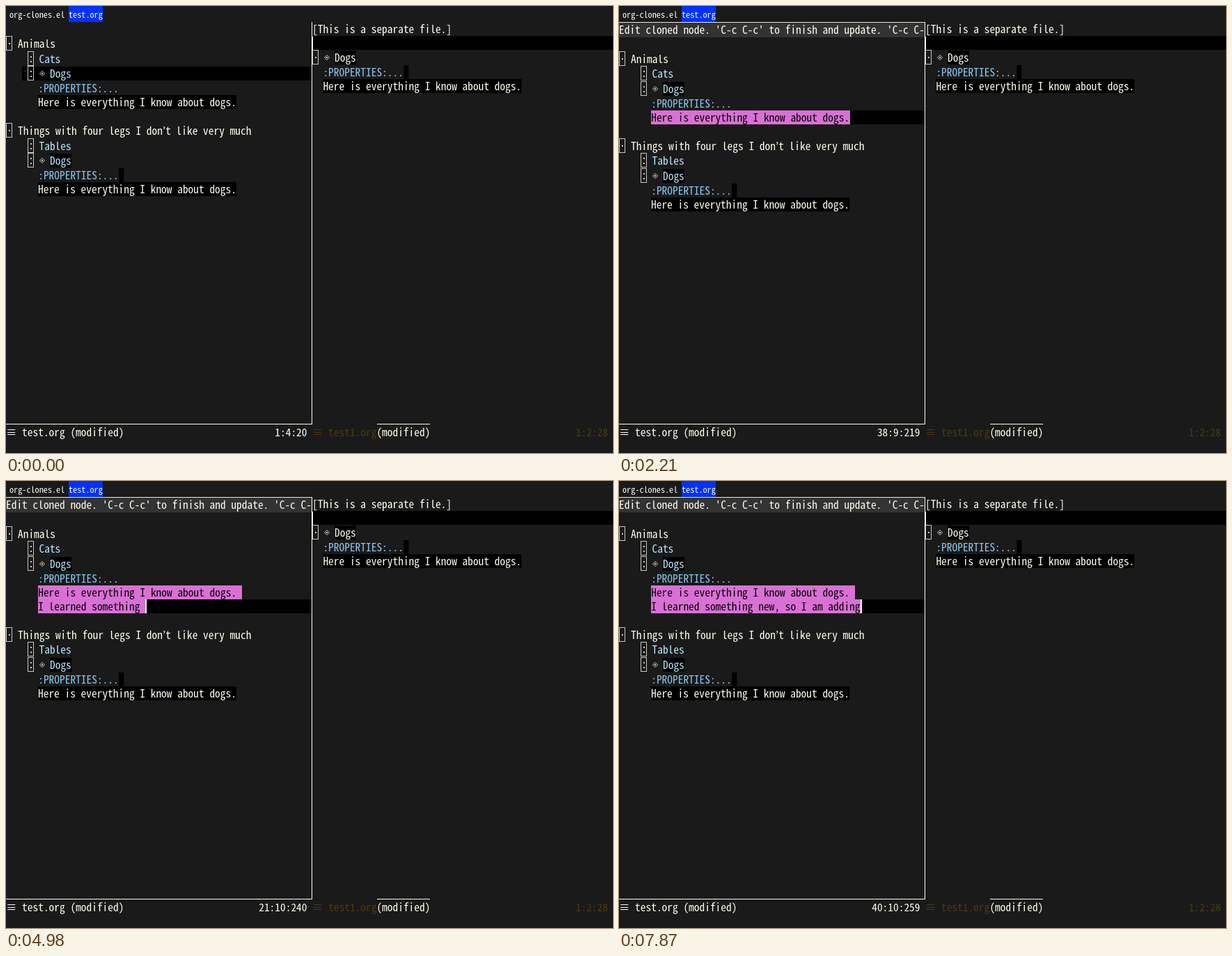
An HTML page with a canvas that plays this animation: 872x642 px, repeating every 8 s.

```html
<!DOCTYPE html>
<html lang="en">
<head>
<meta charset="utf-8">
<title>Editing a cloned node</title>
<style>
html, body { margin: 0; width: 100%; height: 100%; overflow: hidden; background: #1a1a1a; }
canvas { display: block; }
</style>
</head>
<body>
<canvas id="stage" width="872" height="642"></canvas>
<script>
const ctx = document.getElementById('stage').getContext('2d');
const LOOP = 8000, CELL = 7.7, EDGE = 439, INDENT = 46.2;
const CREAM = '#fffff0', BLUE = '#b8e8ff', SKY = '#87c8f0', PINK = '#da70d6', DIM = '#4a3c0c';
const SENTENCE = 'Here is everything I know about dogs.';
const FONT = '"Noto Sans Mono CJK JP", "Noto Sans Mono", monospace';

// Bursts of typing: first time, last time, keys split by "|"; "<" deletes.
const bursts = [
  [3180, 3530, 'I| |l|e|ar'], [3630, 3700, 'n|e'], [3980, 4150, 'd| |s'],
  [4420, 4450, 'o|me'], [4590, 4840, 't|h|i|n'], [4980, 4980, 'g '],
  [5040, 5240, 'n|e|w'], [5380, 5420, ' |s'], [5620, 5620, 'o'],
  [5800, 5890, '<|<'], [6260, 6340, '<|,'], [6480, 6480, ' '],
  [6620, 6740, 's|o| '], [6940, 7310, 'I| |a|m| |a'], [7570, 7570, 'dd'],
  [7720, 7870, 'i|n|g']
];

function typed(t) {
  let out = '';
  for (const [from, to, keys] of bursts) {
    const list = keys.split('|');
    list.forEach((key, i) => {
      const at = from + (to - from) * i / Math.max(1, list.length - 1);
      if (t >= at) out = key === '<' ? out.slice(0, -1) : out + key;
    });
  }
  return out;
}

function rect(x, y, w, h, color) {
  ctx.fillStyle = color;
  ctx.fillRect(x, y, w, h);
}

function setFont(cell) {
  ctx.font = `${cell * 2}px ${FONT}`;
  ctx.letterSpacing = '0px';
  ctx.letterSpacing = `${cell - ctx.measureText('0').width}px`;
}

// y is the middle of the capitals
function text(str, x, y, color = CREAM) {
  ctx.fillStyle = color;
  ctx.fillText(str, x, y + 5.7);
}

function bullet(x, y, dots) {
  ctx.strokeStyle = '#c8c8c0';
  ctx.lineWidth = 1;
  ctx.strokeRect(x + .5, Math.round(y) - 10.5, 8, 20);
  for (const d of dots) rect(x + 4, Math.round(y) + d, 2, 2, '#c8c8c0');
}

function diamond(x, y) {
  ctx.strokeStyle = '#d0d0c8';
  ctx.lineWidth = 1;
  ctx.beginPath();
  ctx.moveTo(x - 3.5, y);
  ctx.lineTo(x, y - 3.5);
  ctx.lineTo(x + 3.5, y);
  ctx.lineTo(x, y + 3.5);
  ctx.closePath();
  ctx.stroke();
  rect(x - 1, y - 1, 2, 2, '#d0d0c8');
}

function heading(str, y) {
  bullet(0, y, [-1]);
  text(str, 17, y);
}

function child(str, y, clone) {
  bullet(31, y, [-4, 3]);
  if (clone) {
    rect(63, y - 10, 31, 20, '#000');
    diamond(52, y);
  }
  text(str, clone ? 63 : 47.5, y, BLUE);
}

function sentence(x, y) {
  rect(x, y - 10, 285, 20, '#000');
  text(SENTENCE, x, y);
}

function drawer(x, y, folded) {
  if (folded) rect(x + 116, y - 10, 7, 20, '#000');
  text(':PROPERTIES:...', x, y, SKY);
}

function leftPane(t) {
  const editing = t >= 1330, header = t >= 2210, split = t >= 2770;
  const top = header ? 21.5 : 0, low = top + (split ? 20 : 0);
  const line = typed(t);
  const row = y => Math.round(y + top);
  const lowRow = y => Math.round(y + low);
  const highlight = (x, y) => rect(x, y - 10, EDGE - x, 20, '#000');

  if (header) {
    rect(0, 24, EDGE, 21, '#333');
    rect(0, 23, EDGE, 1, '#e8e8dc');
    text("Edit cloned node. 'C-c C-c' to finish and update. 'C-c C-", 0, 34.5);
  }
  if (t < 1000) {
    highlight(23, 97);
    text('*', 23, 97, '#1a1a1a');
  } else if (t < 1110) highlight(46, 118);
  else if (!split) highlight(46, row(138));

  heading('Animals', row(54));
  child('Cats', row(75.5));
  child('Dogs', row(97), true);
  drawer(INDENT, row(118));
  const y = row(138);
  if (editing) {
    rect(46, y - 10, split ? 293 : 286, 20, PINK);
    text(SENTENCE, INDENT, y, '#000');
  } else sentence(46, y);
  if (split) {
    const end = Math.round(INDENT + line.length * CELL);
    highlight(46, y + 20);
    rect(46, y + 10, end - 46, 20, PINK);
    text(line, INDENT, y + 20, '#000');
    rect(end, y + 10, 2, 20, '#fff');
  }

  heading('Things with four legs I don’t like very much', lowRow(179));
  child('Tables', lowRow(200.5));
  child('Dogs', lowRow(222), true);
  drawer(INDENT, lowRow(243), true);
  sentence(46, lowRow(263));

  const place = t < 1000 ? '1:4:20' : t < 1110 ? '1:5:28' : !editing ? '1:9:182'
    : !split ? '38:9:219' : `${line.length + 1}:10:${220 + line.length}`;
  rect(0, 600, EDGE, 1, CREAM);
  text('≡ test.org (modified)', 0, 612);
  text(place, 432.5 - place.length * CELL, 612);
}

function rightPane() {
  text('[This is a separate file.]', 440, 33);
  rect(440, 43, 432, 20, '#000');
  rect(440, 44, 1, 19, '#fff');
  bullet(440, 74, [-1]);
  diamond(461, 74);
  rect(472, 64, 31, 20, '#000');
  text('Dogs', 472, 74);
  drawer(455.4, 95, true);
  sentence(455.4, 115);
  text('≡ test1.org', 440, 612, DIM);
  rect(533, 600, 76, 1, CREAM);
  text('(modified)', 532.4, 612);
  text('1:2:28', 818.5, 612, DIM);
}

function draw(t) {
  rect(0, 0, 872, 642, '#1a1a1a');
  setFont(6.1);
  rect(90, 0, 49, 23, '#0032ff');
  text('org-clones.el', 5, 11.5);
  text('test.org', 90, 11.5);
  setFont(CELL);
  leftPane(t);
  rect(EDGE, 23, 1, 578, CREAM);
  rightPane();
}

const start = performance.now();
function tick() {
  draw((performance.now() - start) % LOOP);
  requestAnimationFrame(tick);
}
tick();
</script>
</body>
</html>
```
